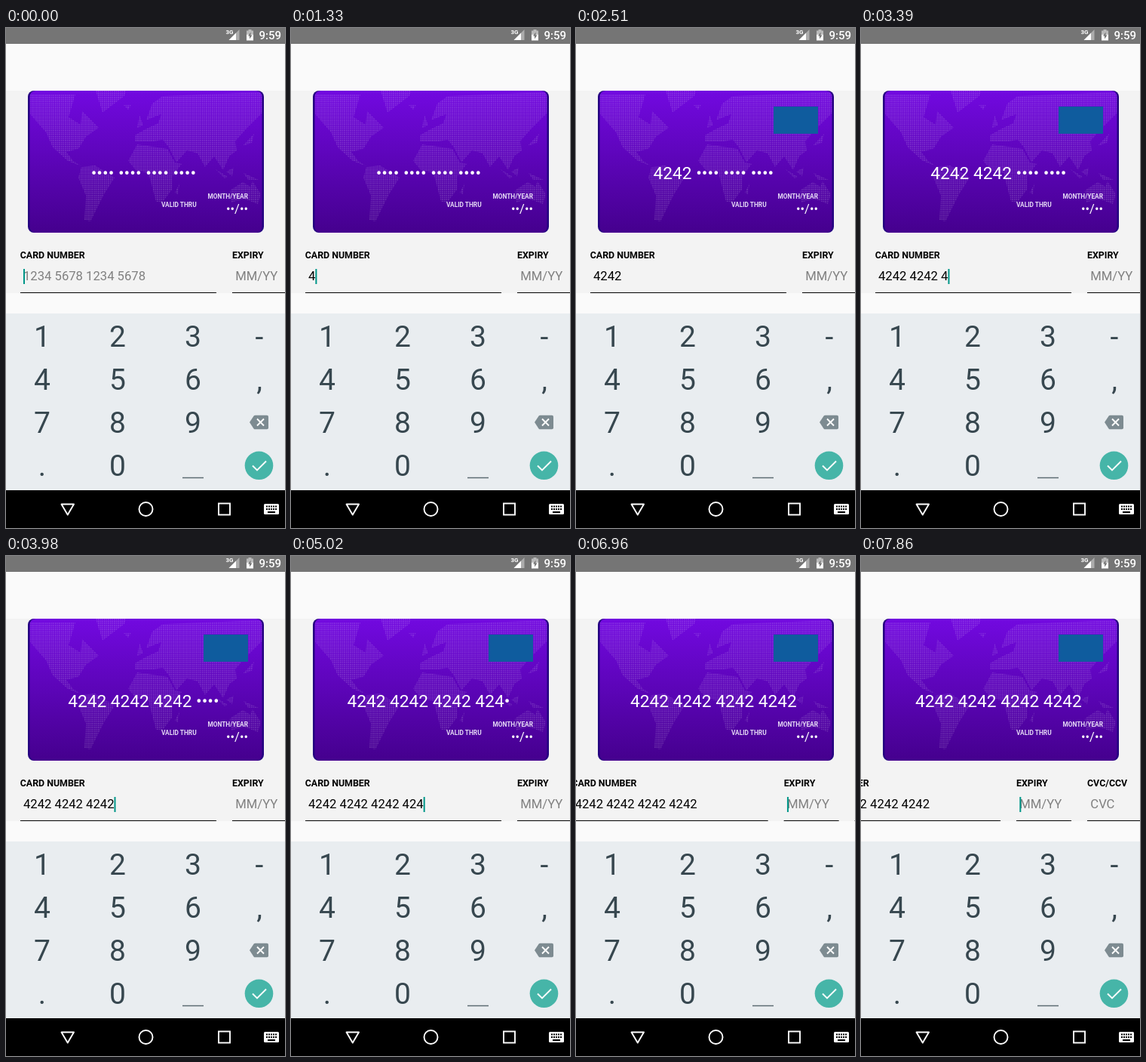
Animation, 370 px wide and 662 px high, one loop 8000 ms. Source, as an HTML page:

```html
<!DOCTYPE html>
<html lang="en">
<head>
<meta charset="utf-8">
<title>Card form</title>
<style>
  html, body { margin: 0; width: 100%; height: 100%; overflow: hidden; background: #fafafa; }
  svg { display: block; font-family: Roboto, "Noto Sans", sans-serif; }
  .label { font-size: 12.4px; font-weight: 700; }
  .input { font-size: 16.65px; }
  .hint { fill: #808080; }
  .small { font-size: 8.3px; font-weight: 700; fill: #e4d8f5; }
  .key { font-size: 39px; fill: #37474f; text-anchor: middle; }
  .line { fill: none; stroke: #fff; stroke-width: 1.9; }
</style>
</head>
<body>
<svg width="370" height="662" viewBox="0 0 370 662">
  <defs>
    <linearGradient id="violet" x2="0" y2="1">
      <stop stop-color="#7209e0"/>
      <stop offset="1" stop-color="#45008e"/>
    </linearGradient>
    <pattern id="dots" width="2.6" height="2.6" patternUnits="userSpaceOnUse">
      <rect width="1.6" height="1.6" fill="#fff" fill-opacity=".19"/>
    </pattern>
    <clipPath id="face"><rect x="31.5" y="83" width="308" height="188" rx="8"/></clipPath>
  </defs>

  <rect width="370" height="662" fill="#fafafa"/>
  <rect y="83" width="370" height="268" fill="#f3f3f3"/>

  <!-- status bar -->
  <rect width="370" height="21" fill="#757575"/>
  <g fill="#fff">
    <text x="291.5" y="7.8" font-size="8" font-weight="700">3G</text>
    <path d="M309.5 2V16H295.5Z" opacity=".4"/>
    <path d="M305 6.5V16H295.500Z"/>
    <path d="M321.5 2h4v1.500h2.500v5h-9v-5h2.500Z" opacity=".5"/>
    <path d="M319 8.500h9v8h-9Z"/>
    <path d="M324.500 5.500l-3.500 5h2v4l3.500-5h-2Z" fill="#757575"/>
    <text x="335.5" y="14.500" font-size="15" font-weight="500">9:59</text>
  </g>

  <!-- card -->
  <rect x="29" y="83" width="313" height="188" rx="8" fill="#240080"/>
  <g clip-path="url(#face)">
    <rect x="31" y="83" width="309" height="188" fill="url(#violet)"/>
    <g fill="url(#dots)">
      <path d="M32 88H92L83 118 99 128 101 110 123 132 106 144 96 160 80 164 89 176 100 183 82 176 62 158 53 138 32 114Z"/>
      <path d="M128 112L118 80H160L157 90ZM156 102h10l-4 6Z"/>
      <path d="M100 184L118 182 144 198 130 220 112 256 104 254 106 222 96 198Z"/>
      <path d="M174 154L214 160 224 178 233 180 221 196 220 214 208 230 199 230 189 192 172 188 162 176ZM230 206l-6 12 4 2Z"/>
      <path d="M171 150V142L185 134 202 126 206 114 186 122 194 100 208 90 340 85V112L318 134 304 150 306 162 296 170 288 188 276 170 264 184 254 166 240 162 226 178 216 158 208 148 196 150Z"/>
      <path d="M174 132l8-3-5-14ZM314 156l12-4 3-12ZM278 187l12 12 4-2ZM292 190l10-5-2 11ZM315 192l20 9h-14Z"/>
      <path d="M297 215L314 204 324 210 327 203 338 220 334 233 315 226 299 231Z"/>
    </g>
  </g>
  <rect id="badge" x="262" y="104" width="59" height="36" fill="#0f5c9e"/>
  <g fill="#fff">
    <text id="number" x="182.4" y="199.500" font-size="22.7" text-anchor="middle"></text>
    <text class="small" x="206" y="236.500">VALID THRU</text>
    <text class="small" x="321" y="225.500" text-anchor="end">MONTH/YEAR</text>
    <text x="321" y="244.500" font-size="16.450" text-anchor="end">••/••</text>
  </g>

  <!-- form -->
  <g id="form">
    <text class="label" x="18.700" y="304.500">CARD NUMBER</text>
    <text class="label" x="300" y="304.500">EXPIRY</text>
    <text class="label" x="394" y="304.500">CVC/CCV</text>
    <text class="input" id="entry" x="23" y="334"></text>
    <text class="input hint" x="304.300" y="334">MM/YY</text>
    <text class="input hint" x="398.300" y="334">CVC</text>
    <path d="M19 350.500H279M300 350.500H373M394 350.500H467" stroke="#000"/>
    <rect id="caret" y="319" width="2" height="20" fill="#009688"/>
  </g>

  <!-- keyboard -->
  <rect y="378" width="370" height="234" fill="#e9edf0"/>
  <g id="keys"></g>
  <path d="M234 595.500H262" stroke="#5c6b72" stroke-width="1.500"/>
  <path d="M346 512.700H330.500Q329.300 512.700 328.500 513.700L323 522 328.500 530.400Q329.300 531.300 330.500 531.300H346Q348 531.300 348 529.300V514.700Q348 512.700 346 512.700Z" fill="#7d8b91"/>
  <path class="line" d="M333 517.500l9 9m0-9l-9 9"/>
  <circle cx="335.500" cy="579.300" r="18.800" fill="#46b5a8"/>
  <path class="line" d="M327 579.500l6 6 12-12"/>

  <!-- navigation bar -->
  <rect y="612" width="370" height="50"/>
  <g class="line">
    <path d="M73.500 630.500h16.500l-8.250 14Z" stroke-linejoin="round"/>
    <circle cx="185.500" cy="637" r="9"/>
    <rect x="282" y="629.500" width="15" height="15"/>
  </g>
  <rect x="342" y="630" width="20" height="14" rx="1.500" fill="#fff"/>
  <path d="M345 633.500h14M345 637h14" stroke="#000" stroke-width="2" stroke-dasharray="2 1"/>
  <path d="M347 641h10" stroke="#000" stroke-width="2"/>
</svg>

<script>
const $ = id => document.getElementById(id);
const LOOP = 8000;

// All times below are in beats: the screen refreshes once per beat
const BEAT = 147.6;
const LAG = 0.55;     // the card follows the field
const BLINK = 3.4;
const ERASE = 42.3, RETYPE = 44.9;
const FOCUS = RETYPE + LAG;

// Four digits per burst: start and gap between keys
const bursts = [[8.8, 1.4], [17.2, 1], [22.85, 1.1], [30.1, 1.66]];
const keys = bursts.flatMap(([start, gap]) => [0, 1, 2, 3].map(i => start + i * gap));
const actions = [-1.95, ...keys, ERASE, RETYPE];

const count = beat => keys.filter(k => k <= beat).length - (beat >= ERASE && beat < RETYPE);
const group = s => s.replace(/(.{4})(?=.)/g, '$1 ');
const show = (el, on) => el.style.display = on ? '' : 'none';

const columns = [48, 148, 248, 336];
$('keys').innerHTML = ['123-', '456,', '789', '.0'].map((row, r) =>
  [...row].map((c, i) => `<text class="key" x="${columns[i]}" y="${422 + 57 * r}">${c}</text>`).join('')
).join('');

function draw(t) {
  const beat = Math.floor((t + 10) / BEAT);
  const typed = count(beat);
  const shown = count(beat - LAG);
  const digits = '4242'.repeat(4).slice(0, 15) + (beat < RETYPE ? '3' : '2');
  const invalid = beat < RETYPE && typed === 16 && count(beat - 1.5) === 16;

  const entry = $('entry');
  entry.textContent = group(typed ? digits.slice(0, typed) : '1234567812345678');
  entry.style.fill = !typed ? '#808080' : invalid ? 'red' : '#000';
  $('number').textContent = group(digits.slice(0, shown).padEnd(16, '•'));
  show($('badge'), shown);

  const idle = Math.max(0, beat - LAG - Math.max(...actions.filter(a => a <= beat)));
  const caret = $('caret');
  show(caret, Math.floor(idle / BLINK) % 2 === 0);
  caret.setAttribute('x', beat >= FOCUS ? 304.3 : 23 + (typed ? entry.getComputedTextLength() : 0));

  // the form eases over to the next field
  const p = Math.min(1, Math.max(0, (beat - Math.ceil(FOCUS)) / 3));
  $('form').setAttribute('transform', `translate(${-94 * p * p * (3 - 2 * p)} 0)`);
}

function tick() {
  draw(performance.now() % LOOP);
  requestAnimationFrame(tick);
}
tick();
</script>
</body>
</html>
```
